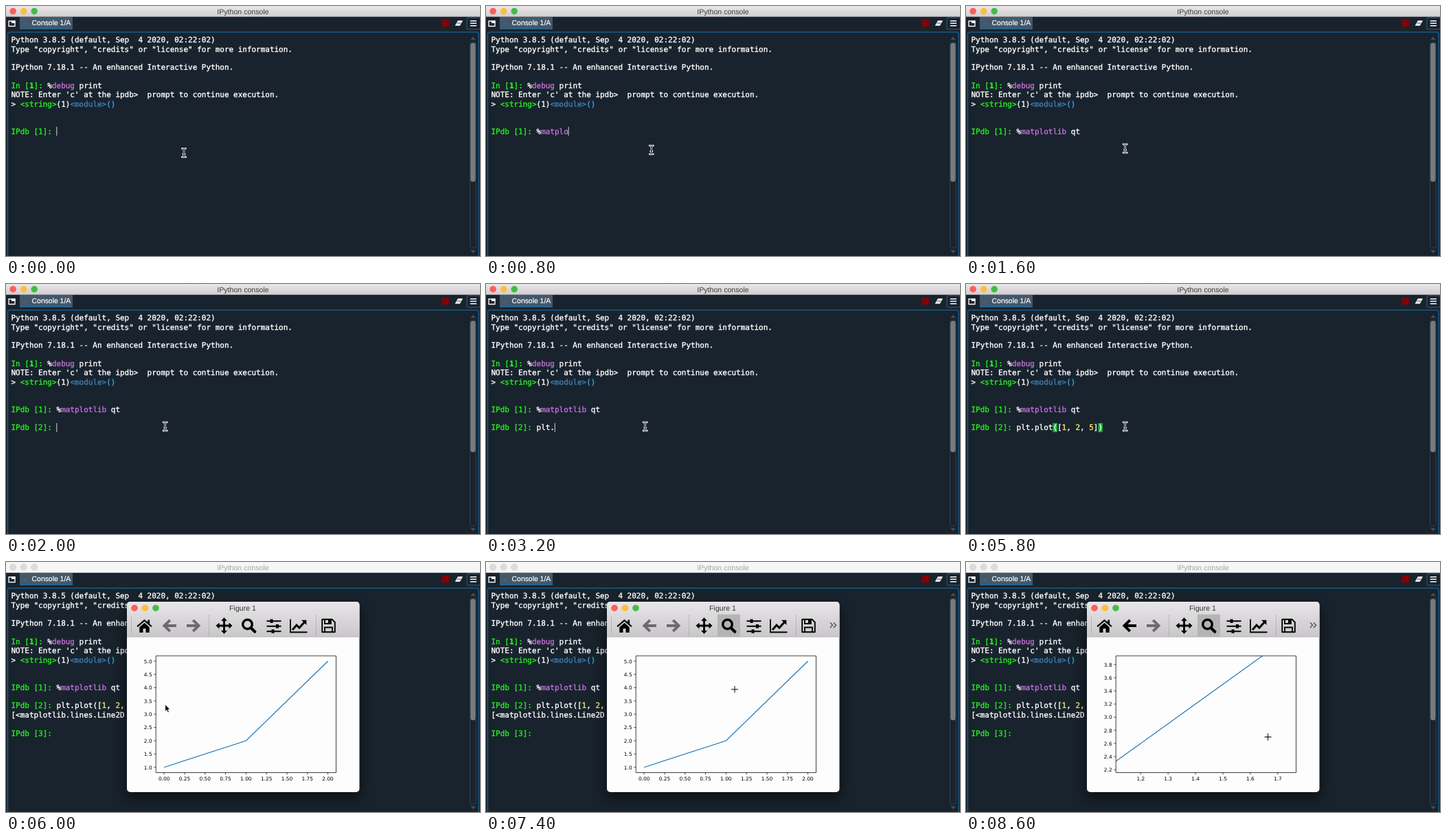
An HTML page for the animation above (8.8 s loop, 690 px wide and 365 px high).

```html
<!DOCTYPE html>
<html lang="en">
<head>
<meta charset="utf-8">
<title>IPython console</title>
<style>
html, body { margin: 0; width: 100%; height: 100%; overflow: hidden; background: #19232d; }
svg { display: block; width: 690px; height: 365px; }
text { text-rendering: geometricPrecision; white-space: pre; }
.ui { font: 10.6px "Liberation Sans", Arial, sans-serif; }
.tab { font-size: 10.4px; fill: #fff; stroke: #fff; stroke-width: .2; }
.code { font: 10.97px "DejaVu Sans Mono", monospace; fill: #fff; stroke: #fff; stroke-width: .35; }
.tick { font: 7.4px "DejaVu Sans", sans-serif; fill: #000; }
.mid { text-anchor: middle; }
.end { text-anchor: end; }
.p { fill: #21f41e; stroke: #21f41e; }
.b { fill: #21f41e; stroke: #21f41e; font-weight: bold; }
.m { fill: #c670e0; stroke: #c670e0; }
.n { fill: #faed5c; stroke: #faed5c; }
.s { fill: #3c80ba; stroke: #3c80ba; }
.c { fill: #2ba9f0; stroke: #2ba9f0; }
.line { fill: none; stroke: #000; }
.icon { fill: #000; stroke: #000; }
.icon .line { stroke: inherit; }
</style>
</head>
<body>
<svg viewBox="0 0 690 365">
  <defs>
    <linearGradient id="bar" x2="0" y2="1">
      <stop stop-color="#e8e6e8"/><stop offset="1" stop-color="#d0ced0"/>
    </linearGradient>
    <linearGradient id="tools" x2="0" y2="1">
      <stop stop-color="#e8e6e8"/><stop offset="1" stop-color="#c9c7c9"/>
    </linearGradient>
    <filter id="shade" x="-20%" y="-20%" width="140%" height="150%">
      <feGaussianBlur stdDeviation="10"/>
    </filter>
    <clipPath id="frame"><rect x="218.2" y="137" width="262.3" height="170.5"/></clipPath>
    <g id="lights">
      <circle r="4.8" fill="#fc5f5a"/>
      <circle cx="15.5" r="4.8" fill="#fdbd3e"/>
      <circle cx="31" r="4.8" fill="#42bd48"/>
    </g>
    <path id="stem" d="M-2.6 -6.2Q0 -6.2 0 -4.6V4.6Q0 6.2 -2.6 6.2M2.6 -6.2Q0 -6.2 0 -4.6V4.6Q0 6.2 2.6 6.2M-1 2H1"/>
  </defs>

  <rect width="690" height="365" fill="#19232d"/>
  <rect id="title" width="690" height="15.7" fill="url(#bar)"/>
  <use id="on" href="#lights" x="10.2" y="7.6"/>
  <g id="off" fill="#dcdcdc" stroke="#cbcbcb" stroke-width=".6">
    <circle cx="10.2" cy="7.6" r="4.7"/><circle cx="25.7" cy="7.6" r="4.7"/><circle cx="41.2" cy="7.6" r="4.7"/>
  </g>
  <text id="name" class="ui mid" x="345" y="11.7">IPython console</text>

  <!-- tab bar -->
  <path d="M20 16H97V32.5Q97 34 95.5 34H21.5Q20 34 20 32.5Z" fill="#43586a"/>
  <rect x="20" y="32.5" width="77" height="1.5" fill="#1d6ba3"/>
  <path d="M25.5 24.2l3 3m0-3l-3 3" stroke="#5d7180" stroke-width=".8"/>
  <text class="ui tab" x="37.6" y="28.2">Console 1/A</text>
  <path d="M4 22H13V29.5H4Z" fill="none" stroke="#fff" stroke-width="1.3"/>
  <rect x="8" y="21.5" width="5.5" height="3.5" fill="#fff"/>
  <rect x="634.7" y="20" width="10" height="10" fill="#860008"/>
  <path d="M657.8 21.2H665L660.8 28.8H653.6Z" fill="#fff"/>
  <path d="M656.3 25H662.2" stroke="#19232d" stroke-width=".9"/>
  <rect x="671" y="17" width="20" height="17" rx="2" fill="#19232d" stroke="#1c6496"/>
  <path d="M675.7 21.8H685M675.7 25.3H685M675.7 28.8H685" stroke="#fff" stroke-width="1.5"/>

  <!-- console frame and scrollbar -->
  <rect x="2.5" y="38.1" width="685.5" height="340" rx="3" fill="none" stroke="#1c6496" stroke-width="1.2"/>
  <rect x="675.5" y="53" width="8.5" height="300" rx="2" fill="#19232d" stroke="#3a4852" stroke-width=".8"/>
  <rect id="thumb" x="676.2" y="54" width="7.2" rx="3" fill="#797c7f"/>
  <path d="M676 49.5L680 45L684 49.5ZM676 356.5L680 361L684 356.5Z" fill="#3f4d57"/>

  <g id="marks" fill="#10b03a"></g>
  <g id="lines"></g>
  <rect id="caret" width="1" height="13" fill="#d5d8da"/>

  <!-- figure window -->
  <g id="fig">
    <rect x="174" y="66" width="342" height="280" rx="8" fill="#000" opacity=".55" filter="url(#shade)"/>
    <rect x="176" y="58" width="338.5" height="278" rx="5" fill="#fdfdfd"/>
    <path d="M176 109.5V63Q176 58 181 58H509.5Q514.5 58 514.5 63V109.5Z" fill="url(#tools)"/>
    <rect id="held" x="337" y="76.5" width="33" height="32.5" fill="#b5b3b5"/>
    <path d="M176 109.3H514.5" stroke="#b2b0b2" stroke-width=".7"/>
    <use href="#lights" x="187" y="67.2"/>
    <text class="ui mid" x="344.5" y="71" fill="#333">Figure 1</text>
    <path d="M182.5 80V106M295.5 78V108M451.5 78V108" stroke="#8f8d8f" stroke-dasharray="1 1.4"/>
    <g class="icon">
      <g transform="translate(201.5 93)">
        <path class="line" d="M-10.3 1.2L0 -7.8L10.3 1.2" stroke-width="2.3"/>
        <path d="M-7.2 2.2L0 -4.2L7.2 2.2V10H2V4.2H-2V10H-7.2ZM4.8 -8.5H7.6V-1L4.8 -3.5Z" stroke="none"/>
      </g>
      <g id="back" transform="translate(238 93)"><path class="line" d="M.8 -8.2L-7.6 0L.8 8.2M-7 0H10" stroke-width="3.9"/></g>
      <g transform="translate(273 93)" stroke="#6c6a6c"><path class="line" d="M-.8 -8.2L7.6 0L-.8 8.2M7 0H-10" stroke-width="3.9"/></g>
      <g transform="translate(317.5 93)">
        <path class="line" d="M-8 0H8M0 -8V8" stroke-width="2.8"/>
        <path d="M-12 0L-7 -4.4V4.4ZM12 0L7 -4.4V4.4ZM0 -12L-4.4 -7H4.4ZM0 12L-4.4 7H4.4Z" stroke="none"/>
      </g>
      <g transform="translate(353.5 93)">
        <circle class="line" cx="-2" cy="-2" r="6.8" stroke-width="3.4"/>
        <path class="line" d="M3.4 3.4L8.8 8.8" stroke-width="4.2" stroke-linecap="round"/>
      </g>
      <g transform="translate(390 93)">
        <path class="line" d="M-10.5 -6.8H10.5M-10.5 .7H10.5M-10.5 8.2H10.5" stroke-width="2"/>
        <path d="M-5.5 -9.5h4v5.4h-4zM3 -2h4v5.4h-4zM-3.5 5.5h4v5.4h-4z" stroke="none"/>
      </g>
      <g transform="translate(426 93)">
        <path class="line" d="M-12 -9.5V9.5H12.5" stroke-width="1.8"/>
        <path class="line" d="M-9 6L-3 -.8L1 3L8.5 -5.2" stroke-width="3"/>
        <path d="M4 -8.3H11.3V-1Z" stroke="none"/>
      </g>
      <g transform="translate(469.5 93)">
        <path class="line" d="M-9.3 -9.3H5L9.3 -5V9.3H-9.3Z" stroke-width="1.9" stroke-linejoin="round"/>
        <path class="line" d="M-5.5 9V2.5H5.5V9M-5.5 -9V-3H3.5V-9" stroke-width="1.8"/>
        <path d="M-.5 -9H3.5V-3H-.5Z" stroke="none"/>
      </g>
    </g>
    <path id="more" fill="none" d="M501 88.5L504.6 92.3L501 96.1M506 88.5L509.6 92.3L506 96.1" stroke="#555" stroke-width="1.5"/>
    <g id="full"></g>
    <g id="zoomed"></g>
    <rect id="band" class="line" stroke-width=".7" stroke-dasharray="2 1.5"/>
  </g>

  <!-- pointers -->
  <g id="beam" fill="none">
    <use href="#stem" stroke="#fff" stroke-width="2.7" stroke-linecap="round"/>
    <use href="#stem" stroke="#151b21" stroke-width=".9"/>
  </g>
  <path id="arrow" d="M0 0V10.2L2.3 8.1L3.9 11.8L5.7 11L4.1 7.4H7.2Z" fill="#000" stroke="#fff" stroke-width=".8"/>
  <g id="cross">
    <path d="M-5 0H5M0 -5V5" stroke="#fff" stroke-width="2.4"/>
    <path d="M-5 0H5M0 -5V5" stroke="#000" stroke-width="1"/>
  </g>
</svg>
<script>
const STEP = 200, LOOP = 8800, LEFT = 7.5, TOP = 53.4, CW = 6.604, ROW = 13.34;
const $ = id => document.getElementById(id);
const show = (id, on) => { $(id).style.display = on ? '' : 'none'; };
const attr = (el, o) => { for (const k in o) el.setAttribute(k, o[k]); return el; };
const add = (box, tag, o, txt) => {
  const el = attr(document.createElementNS('http://www.w3.org/2000/svg', tag), o);
  if (txt !== undefined) el.textContent = txt;
  box.appendChild(el);
  return el;
};

// Each part is [class, text]
function fill(el, parts) {
  el.textContent = '';
  for (const [cls, s] of parts) add(el, 'tspan', { class: cls }, s);
}
function line(row, ...parts) {
  const el = add($('lines'), 'text', { class: 'code', x: LEFT, y: TOP + row * ROW });
  fill(el, parts);
  return el;
}
const prompt = n => [['p', `IPdb [${n}]: `]];

line(0, ['', 'Python 3.8.5 (default, Sep  4 2020, 02:22:02)']);
line(1, ['', 'Type "copyright", "credits" or "license" for more information.']);
line(3, ['', 'IPython 7.18.1 -- An enhanced Interactive Python.']);
line(5, ['p', 'In ['], ['b', '1'], ['p', ']: '], ['', '%'], ['m', 'debug'], ['', ' print']);
line(6, ['', "NOTE: Enter 'c' at the ipdb>  prompt to continue execution."]);
line(7, ['', '> '], ['p', '<string>'], ['', '(1)'], ['s', '<module>'], ['c', '()']);
const first = line(10), second = line(12);
const reply = line(13, ['', '[<matplotlib.lines.Line2D at 0x7fd2c81a4e50>]']);
const third = line(15, ...prompt(3));

const MAGIC = '%matplotlib qt', PLOT = 'plt.plot([1, 2, 5])';
const magic = s => [['', s.slice(0, 1)], ['m', s.slice(1, 11)], ['', s.slice(11)]];
const call = s => s.split(/(\d)/).map(w => [/\d/.test(w) ? 'n' : '', w]);

// Characters typed after each step
const keys1 = [0, 1, 3, 5, 7, 9, 11, 13, 14];
const keys2 = [0, 1, 3, 4, 5, 7, 8, 9, 10, 11, 13, 16, 17, 18, 19];
const typed = (keys, i) => keys[Math.max(0, Math.min(i, keys.length - 1))];

const BOX = { l: 218.2, r: 480.5, t: 137, b: 307.5 };
function axes(id, [x0, x1], [y0, y1], xt, yt) {
  const g = $(id);
  const px = x => BOX.l + (x - x0) / (x1 - x0) * (BOX.r - BOX.l);
  const py = y => BOX.b - (y - y0) / (y1 - y0) * (BOX.b - BOX.t);
  const each = ([from, step, n, digits], fn) => {
    for (let i = 0; i < n; i++) fn(from + i * step, (from + i * step).toFixed(digits));
  };
  const pts = [[0, 1], [1, 2], [2, 5]].map(([x, y]) => px(x) + ',' + py(y)).join(' ');
  add(add(g, 'g', { 'clip-path': 'url(#frame)' }), 'polyline',
    { points: pts, fill: 'none', stroke: '#1f77b4', 'stroke-width': 1.2 });
  let d = `M${BOX.l} ${BOX.t}H${BOX.r}V${BOX.b}H${BOX.l}Z`;
  each(xt, (v, s) => {
    d += `M${px(v)} ${BOX.b}v2.7`;
    add(g, 'text', { class: 'tick mid', x: px(v), y: BOX.b + 11.3 }, s);
  });
  each(yt, (v, s) => {
    d += `M${BOX.l} ${py(v)}h-2.7`;
    add(g, 'text', { class: 'tick end', x: BOX.l - 5.6, y: py(v) + 2.8 }, s);
  });
  add(g, 'path', { class: 'line', d, 'stroke-width': .75 });
}
axes('full', [-.1, 2.1], [.8, 5.2], [0, .25, 9, 2], [1, .5, 9, 1]);
axes('zoomed', [1.1095, 1.767], [2.156, 3.933], [1.2, .1, 6, 1], [2.2, .2, 9, 1]);

// Pointer path: step, x, y
const path = [[0, 259, 214.2], [2, 259, 214.2], [5, 231.7, 208], [30, 231.7, 208], [31, 245, 195],
  [34, 352, 94], [35, 352, 94], [37, 362, 186], [40, 439.5, 255.5], [44, 439.5, 255.5]];
function pointer(i) {
  const k = Math.max(1, path.findIndex(p => p[0] >= i));
  const [a, x, y] = path[k - 1], [b, u, v] = path[k];
  const f = (i - a) / (b - a);
  return [x + (u - x) * f, y + (v - y) * f];
}

function drawConsole(i, open) {
  const n1 = typed(keys1, i), n2 = typed(keys2, i - 13), ready = i >= 10;
  fill(first, [...prompt(1), ...magic(MAGIC.slice(0, n1))]);
  fill(second, ready ? [...prompt(2), ...call(PLOT.slice(0, n2))] : []);
  reply.style.display = third.style.display = open ? '' : 'none';
  attr($('thumb'), { height: open ? 177 : ready ? 191.5 : 202.5 });

  const row = ready ? 12 : 10, col = 10 + (ready ? n2 : n1);
  show('caret', i < 8 || (i >= 10 && i < 29 && i !== 13));
  attr($('caret'), { x: LEFT + col * CW - .2, y: TOP - 10.4 + row * ROW });

  const marks = $('marks');
  marks.textContent = '';
  const pair = open ? [] : n2 === 18 ? [19, 27] : n2 === 19 ? [18, 28] : [];
  for (const c of pair)
    add(marks, 'rect', { x: LEFT + c * CW, y: TOP - 10.4 + 12 * ROW, width: CW, height: 13.2 });
}

function draw(i) {
  const open = i >= 30, tool = i >= 35, zoom = i >= 41;
  attr($('title'), { fill: open ? '#f6f6f6' : 'url(#bar)' });
  attr($('name'), { fill: open ? '#a3a3a3' : '#3c3c3c' });
  show('on', !open);
  show('off', open);
  drawConsole(i, open);

  show('fig', open);
  show('held', tool);
  show('more', i >= 31);
  show('full', !zoom);
  show('zoomed', zoom);
  $('back').style.stroke = zoom ? '#000' : '#6c6a6c';

  const [x, y] = pointer(i), cross = tool && y > BOX.t;
  const kind = !open ? 'beam' : cross ? 'cross' : 'arrow';
  for (const id of ['beam', 'arrow', 'cross']) show(id, id === kind);
  attr($(kind), { transform: `translate(${x} ${y})` });

  show('band', i > 37 && !zoom);
  attr($('band'), { x: 362, y: 186, width: Math.max(0, x - 362), height: Math.max(0, y - 186) });
}

const start = performance.now();
let last = -1;
function tick() {
  const i = Math.floor(((performance.now() - start) % LOOP) / STEP);
  if (i !== last) draw(last = i);
  requestAnimationFrame(tick);
}
tick();
</script>
</body>
</html>
```
